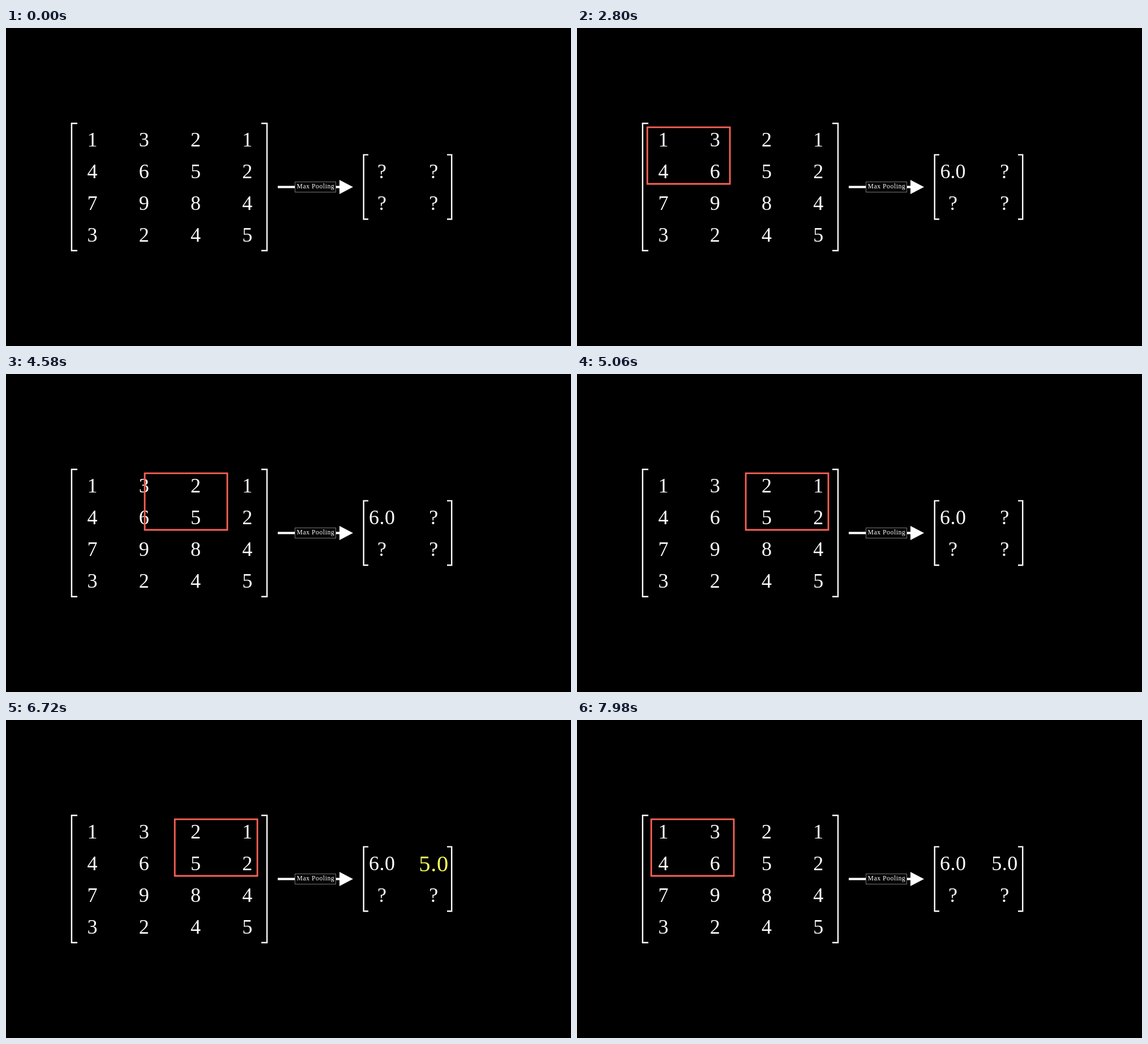
Write an HTML page that moves like this. It is 998 by 561 pixels and loops after 8 s.

```html
<!DOCTYPE html>
<html lang="en">
<head>
<meta charset="utf-8">
<title>Max Pooling</title>
<style>
  html, body { margin: 0; width: 100%; height: 100%; overflow: hidden; background: #000; }
  svg { display: block; width: 100vw; height: 100vh; }
  text { font-family: "Liberation Serif", serif; font-size: 36px; text-anchor: middle; }
  .bracket { fill: none; stroke: #fff; stroke-width: 2.4; }
  #window { fill: none; stroke: #fc6255; stroke-width: 2.8; }
  #label { font-size: 11.7px; letter-spacing: .55px; text-anchor: start; }
</style>
</head>
<body>
<svg id="stage" viewBox="0 0 998 561" fill="#fff">
  <path class="bracket" d="M126 168.2H115.9V392.8H126M451 168.2H461V392.8H451"/>
  <path class="bracket" d="M640 223.6H631.7V337.2H640M779 223.6H787.2V337.2H779"/>
  <path d="M480 278.4H589V268L613 280.5L589 293V282.6H480Z"/>
  <rect x="510.5" y="271.5" width="72" height="18" fill="#000" stroke="#777" stroke-width="1"/>
  <text id="label" x="513.5" y="283.3">Max Pooling</text>
  <g id="numbers"></g>
  <path id="window"/>
</svg>
<script>
const LOOP = 8000;
const COLUMN = 91.3, ROW = 56.1;
const GLYPH_OFFSETS = [-14, 0, 14];
const numbers = document.getElementById("numbers");
const windowPath = document.getElementById("window");

const clamp = v => Math.min(1, Math.max(0, v));
const sigmoid = v => 1 / (1 + Math.exp(-v));
const smooth = v => {
  const edge = sigmoid(-5);
  return clamp((sigmoid(10 * (clamp(v) - .5)) - edge) / (1 - 2 * edge));
};
const step = (t, start) => smooth((t - start) / 1000);
const thereAndBack = (t, start) => {
  const p = clamp((t - start) / 1000);
  return smooth(p < .5 ? 2 * p : 2 - 2 * p);
};

function add(parent, tag, attrs = {}, content = "") {
  const node = document.createElementNS("http://www.w3.org/2000/svg", tag);
  for (const key in attrs) node.setAttribute(key, attrs[key]);
  node.textContent = content;
  return parent.appendChild(node);
}

["1321", "4652", "7984", "3245"].forEach((row, r) =>
  [...row].forEach((digit, c) =>
    add(numbers, "text", { x: 152.4 + c * COLUMN, y: 209 + r * ROW }, digit)));

// An output cell whose "?" turns into a value and is then highlighted.
function makeCell(column, value, start) {
  const x = 664 + column * COLUMN;
  const group = add(numbers, "g");
  const slots = [...value].map(char => ({
    question: add(group, "text", { y: 12 }, "?"),
    glyph: add(group, "text", { y: 12 }, char)
  }));
  return t => {
    const s = step(t, start), glow = thereAndBack(t, start + 1000);
    group.setAttribute("transform", `translate(${x} 253) scale(${1 + .2 * glow})`);
    group.setAttribute("fill", `rgb(255 255 ${255 * (1 - glow)})`);
    slots.forEach(({ question, glyph }, i) => {
      question.setAttribute("x", GLYPH_OFFSETS[i] * s);
      glyph.setAttribute("x", GLYPH_OFFSETS[i] * s);
      question.setAttribute("opacity", (1 - s) * (i ? s : 1));
      glyph.setAttribute("opacity", s);
    });
  };
}

const cells = [makeCell(0, "6.0", 2000), makeCell(1, "5.0", 5000)];
for (const c of [0, 1]) add(numbers, "text", { x: 664 + c * COLUMN, y: 265 + ROW }, "?");

// Each side takes a quarter of the drawing time, starting at the top right.
function drawWindow(t) {
  const left = 124.2 + 173.9 * step(t, 4000) - 167.2 * step(t, 7000);
  const right = left + 145.9, top = 175.2, bottom = 275;
  const corners = [[right, top], [left, top], [left, bottom], [right, bottom], [right, top]];
  const drawn = 4 * step(t, 0);
  let d = "";
  if (drawn > 0) {
    d = `M${corners[0]}`;
    for (let i = 0; i < 4 && i < drawn; i++) {
      const part = clamp(drawn - i), from = corners[i], to = corners[i + 1];
      d += `L${from.map((v, k) => v + (to[k] - v) * part)}`;
    }
    if (drawn === 4) d += "Z";
  }
  windowPath.setAttribute("d", d);
}

function render() {
  const t = performance.now() % LOOP;
  cells.forEach(update => update(t));
  drawWindow(t);
  requestAnimationFrame(render);
}
render();
</script>
</body>
</html>
```
